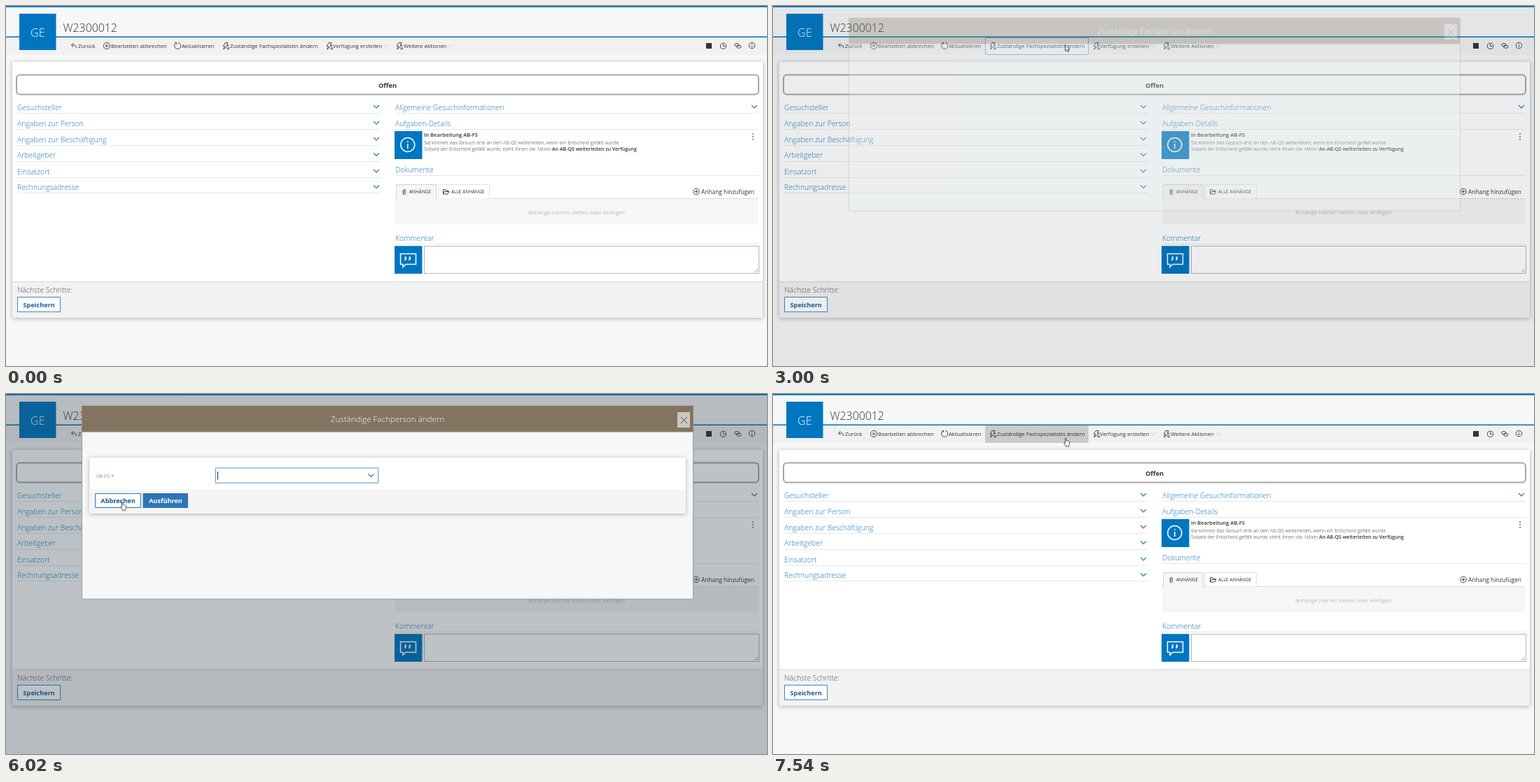
These frames come from a looping animation (1087x515 px, 8 s). An HTML page:

```html
<!DOCTYPE html>
<html lang="de">
<head>
<meta charset="utf-8">
<title>Zuständige Fachperson ändern</title>
<style>
html, body { margin: 0; width: 100%; height: 100%; overflow: hidden; background: #f7f7f7; }
svg { display: block; width: 1087px; height: 515px; }
text { font-family: "Open Sans", "Noto Sans", sans-serif; font-size: 7.7px; fill: #333; white-space: pre; }
.mid { text-anchor: middle; }
.head { font-size: 10.4px; font-weight: 300; fill: #1a78ba; }
.note { font-size: 7.03px; font-weight: 300; }
.strong { font-weight: 600; }
.btn { font-size: 9.15px; font-weight: 700; fill: #1b5c9c; }
.line { fill: none; stroke: #333; stroke-width: .9; }
.rule { stroke: #e6e6e6; }
.chev { fill: none; stroke: #1a78ba; stroke-width: 1.1; }
.white { fill: none; stroke: #fff; stroke-width: 1.5; }

.play, .play * { animation: 8s step-end infinite; }
#hover { animation-name: hover; }
#focus { animation-name: focus; }
#shade { animation-name: shade; }
#dialog { animation-name: dialog; }
#form { animation-name: form; }
#caret { animation-name: caret; }
#run { animation-name: run; }
#cancel { animation-name: cancel; }
#load { animation-name: load; }
#cursor { animation-name: move; }
#arrow { animation-name: arrow; }
#hand { animation-name: hand; }
#beam { animation-name: beam; }

@keyframes hover { 0%, 37.5% { opacity: 0 } 31.25%, 94.25%, 100% { opacity: 1 } }
@keyframes focus { 0%, 81.5%, 100% { opacity: 0 } 37.5% { opacity: 1 } }
@keyframes shade { 0%, 81.5%, 100% { opacity: 0 } 37.5% { opacity: .09 } 44% { opacity: .3 } }
@keyframes dialog { 0%, 81.5%, 100% { opacity: 0 } 37.5% { opacity: .28 } 44% { opacity: 1 } }
@keyframes form { 0%, 81.5%, 100% { opacity: 0 } 50.25% { opacity: 1 } }
@keyframes caret { 0%, 56.5%, 69%, 100% { opacity: 0 } 50.25%, 62.75%, 75.25% { opacity: 1 } }
@keyframes run { 0%, 69%, 100% { fill: #2e75b6 } 62.75% { fill: #1f5c98 } }
@keyframes cancel { 0%, 81.5%, 100% { fill: #2e75b6 } 69% { fill: #1b4f86 } }
@keyframes load { 0%, 88%, 100% { opacity: 0 } 81.5% { opacity: 1 } }
@keyframes arrow {
  0%, 31.25%, 50.25%, 62.75%, 94.25%, 100% { opacity: 0 }
  6.25%, 37.5%, 56.5%, 81.5% { opacity: 1 }
}
@keyframes hand { 0%, 37.5%, 81.5% { opacity: 0 } 31.25%, 62.75%, 94.25%, 100% { opacity: 1 } }
@keyframes beam { 0%, 56.5%, 100% { opacity: 0 } 50.25% { opacity: 1 } }
@keyframes move {
  0%, 6.25% { transform: translate(1010px, 493px) }
  12.5% { transform: translate(630px, 291px) }
  18.75% { transform: translate(482px, 182px) }
  25% { transform: translate(443px, 70px) }
  31.25% { transform: translate(416px, 56px) }
  37.5% { transform: translate(417px, 55px) }
  44% { transform: translate(418px, 54px) }
  50.25% { transform: translate(455px, 112px) }
  56.5% { transform: translate(486px, 138px) }
  62.75% { transform: translate(224px, 148px) }
  69% { transform: translate(162px, 153px) }
  75.25% { transform: translate(163px, 153.5px) }
  81.5% { transform: translate(165px, 153px) }
  88% { transform: translate(169px, 154px) }
  94.25%, 100% { transform: translate(415px, 62px) }
}
</style>
</head>
<body>
<svg viewBox="0 0 1087 515">
  <defs>
    <path id="chevron" d="M-4 -2L0 2L4 -2"/>
    <path id="bolt" d="M-1 -4.5H3L1 -1H4L-3.5 5L-1.2 .8H-3.8ZM1 4.5L4 1.5M2 4.8H4.3V2.5"/>
    <filter id="soft" x="-5%" y="-10%" width="110%" height="125%">
      <feDropShadow dx="0" dy="1" stdDeviation="3" flood-color="#000" flood-opacity=".3"/>
    </filter>
  </defs>

  <!-- header and toolbar -->
  <path fill="#f7f7f7" d="M0 0H1087V515H0z"/>
  <path fill="#f1f1f1" d="M0 45H1087V70H0z"/>
  <path fill="#0072b8" d="M0 0H1087V1.8H0zM0 43.6H1087V45.1H0z"/>
  <path fill="#0076c0" d="M19 11H71.5V63H19z"/>
  <text class="mid" x="45.3" y="43.5" style="font-size:16px;font-weight:300;fill:#fff">GE</text>
  <text x="81.5" y="36.5" style="font-size:15.8px;font-weight:300">W2300012</text>
  <g class="play">
    <path id="hover" fill="#cacaca" d="M303 45H450.5V70H303z"/>
    <path id="focus" fill="#f4f8fc" stroke="#7fb0e2" d="M303.5 45.5H450.5V69.5H303.5z"/>
  </g>
  <g class="line">
    <path d="M96.5 53L93.5 56L96.5 59M93.5 56H98.5Q101 56.5 100.5 60"/>
    <circle cx="144" cy="57" r="4.6"/>
    <path d="M142 55L146 59M146 55L142 59M242.2 53.3A4.6 4.6 0 1 0 246 52.3M241 52.5H243.5V55"/>
    <use href="#bolt" x="314" y="57"/>
    <use href="#bolt" x="462" y="57"/>
    <use href="#bolt" x="562" y="57"/>
    <circle cx="1024.5" cy="57.3" r="4.1"/>
    <path d="M1024.5 54.5V57.5H1027"/>
    <rect x="1040.8" y="53.6" width="6" height="4" rx="2"/>
    <rect x="1043.8" y="56.2" width="6" height="4" rx="2"/>
    <circle cx="1065.5" cy="56.5" r="4.2"/>
    <path d="M1065.5 56V59M1065.5 53.8V55"/>
    <g stroke="#c4c4c4" stroke-width=".8">
      <use href="#chevron" x="543.5" y="57"/>
      <use href="#chevron" x="636" y="57"/>
    </g>
  </g>
  <path fill="#333" d="M1000 53H1008V61H1000z"/>
  <text x="103" y="59.8">Zurück</text>
  <text x="150" y="59.8">Bearbeiten abbrechen</text>
  <text x="251" y="59.8">Aktualisieren</text>
  <text x="320" y="59.8">Zuständige Fachspezialistin ändern</text>
  <text x="467" y="59.8">Verfügung erstellen</text>
  <text x="568" y="59.8">Weitere Aktionen</text>

  <!-- main panel -->
  <path filter="url(#soft)" fill="#fff" d="M9 80H1081V446H9z"/>
  <path fill="#f2f2f2" d="M9 394H1081V446H9z"/>
  <path stroke="#dedede" stroke-width="1.5" d="M9 394.5H1081"/>
  <rect x="15" y="98.5" width="1060" height="28" rx="5" fill="#fff" stroke="#a6a6a6" stroke-width="2"/>
  <text class="mid" x="545" y="116.5" style="font-size:9.3px;font-weight:700">Offen</text>

  <path class="rule" d="M16 153.5H536M16 176.5H536M16 199.5H536M16 222.5H536M16 245.5H536M16 267.5H536M556 153.5H1075M556 176.5H1075M556 242.5H1075M556 340.5H1075"/>
  <g class="chev">
    <use href="#chevron" x="529" y="144"/>
    <use href="#chevron" x="529" y="167"/>
    <use href="#chevron" x="529" y="190"/>
    <use href="#chevron" x="529" y="212.5"/>
    <use href="#chevron" x="529" y="236"/>
    <use href="#chevron" x="529" y="258.5"/>
    <use href="#chevron" x="1069" y="144"/>
  </g>
  <text class="head" x="16" y="148.5">Gesuchsteller</text>
  <text class="head" x="16" y="171.7">Angaben zur Person</text>
  <text class="head" x="16" y="194.5">Angaben zur Beschäftigung</text>
  <text class="head" x="16" y="217.3">Arbeitgeber</text>
  <text class="head" x="16" y="240.7">Einsatzort</text>
  <text class="head" x="16" y="263.3">Rechnungsadresse</text>
  <text class="head" x="556" y="148.5">Allgemeine Gesuchinformationen</text>
  <text class="head" x="556" y="171.7">Aufgaben-Details</text>
  <text class="head" x="556" y="238.3">Dokumente</text>
  <text class="head" x="556" y="335.7">Kommentar</text>

  <!-- task details -->
  <path fill="#0076c0" d="M555 179H594.5V219H555zM555 343.3H594.5V383H555z"/>
  <g class="white">
    <circle cx="573.8" cy="198.5" r="10"/>
    <path d="M573.8 197V204M573.8 193V195"/>
    <path d="M563.5 354.5H585.5V369.5H571L567 373.5V369.5H563.5z"/>
    <path stroke-width="2.2" d="M570.8 358.5V361.5M570.8 361Q570.8 363 569.5 363.5M576.8 358.5V361.5M576.8 361Q576.8 363 575.5 363.5"/>
  </g>
  <text class="strong" x="597" y="187.3" style="font-size:7.6px">In Bearbeitung AB-FS</text>
  <text class="note" x="597" y="197.5">Sie können das Gesuch erst an den AB-QS weiterleiten, wenn ein Entscheid gefällt wurde.</text>
  <text class="note" x="597" y="207.3">Sobald der Entscheid gefällt wurde, steht Ihnen die Aktion</text>
  <text class="note strong" x="780" y="207.3">An AB-QS weiterleiten zu Verfügung</text>
  <path fill="#444" d="M1066.3 182.5h1.5v1.5h-1.5zM1066.3 186.2h1.5v1.5h-1.5zM1066.3 190h1.5v1.5h-1.5z"/>

  <!-- documents -->
  <path fill="#f6f6f6" d="M556 275.5H1074.5V312.5H556z"/>
  <path stroke="#dcdcdc" d="M556 275.5H1074.5"/>
  <path fill="#f6f6f6" stroke="#d2d2d2" d="M557.5 276V255.5H614.5V276"/>
  <path fill="#fff" stroke="#e2e2e2" d="M617.5 275.5V255.5H690.5V275.5"/>
  <g class="line" stroke-width=".8">
    <path stroke="#777" stroke-width="1.2" d="M567 263V268.5Q568.8 271 570.5 268.5V263.5Q569.2 261.2 568.5 263.5V268"/>
    <path d="M624.5 269V262.5H627.5L628.5 264H631.5V265.5M624.5 269L626.3 265.5H633L631 269z"/>
    <circle cx="986" cy="265.5" r="4.3"/>
    <path d="M983.5 265.5H988.5M986 263V268"/>
  </g>
  <text x="576" y="268" style="font-size:6.5px">ANHÄNGE</text>
  <text x="636" y="268" style="font-size:6.5px">ALLE ANHÄNGE</text>
  <text x="993" y="268.8" style="font-size:8.37px">Anhang hinzufügen</text>
  <text class="mid" x="815" y="297.5" style="fill:#b9b9b9">Anhänge hierher ziehen oder einfügen</text>

  <!-- comment and footer -->
  <path fill="#fff" stroke="#b4b4b4" d="M597.5 343.5H1075.5V382.5H597.5z"/>
  <path stroke="#888" stroke-width=".8" d="M1069 381L1074 376M1072 381L1074 379"/>
  <text class="head" x="16" y="410.3" style="fill:#555">Nächste Schritte:</text>
  <path fill="#fff" stroke="#3c86c4" d="M16.5 416.5H77.5V437.5H16.5z"/>
  <text class="btn mid" x="47.2" y="430.8">Speichern</text>

  <g class="play">
    <path id="shade" fill="#203440" d="M0 0H1087V515H0z"/>
    <g id="dialog">
      <path fill="#f1f2f2" stroke="#9a9a98" d="M108.5 17H981.5V293H108.5z"/>
      <path fill="#837361" d="M108.5 17H981.5V54H108.5z"/>
      <path stroke="#b5aca1" d="M109 54.3H981.5"/>
      <text class="mid" x="545" y="39.6" style="font-size:11.6px;font-weight:300;fill:#fff">Zuständige Fachperson ändern</text>
      <path fill="#cdc7c0" d="M959 26H977V48H959z"/>
      <path class="line" d="M964 33L973 42M973 33L964 42"/>
      <g id="form">
        <path fill="#f7f7f7" d="M109 55H981V292.5H109z"/>
        <path filter="url(#soft)" fill="#fff" d="M119.5 91H970.5V171H119.5z"/>
        <path fill="#f5f5f5" d="M119.5 136.5H970.5V171H119.5z"/>
        <text x="128.5" y="119.5" style="font-size:7.5px;font-weight:300;fill:#1b5c9c">AB-FS *</text>
        <path fill="none" stroke="#e4eef8" stroke-width="4" d="M299.5 106H531.5V127H299.5z"/>
        <path fill="#fff" stroke="#72a5d8" d="M299.5 106H531.5V127H299.5z"/>
        <use class="chev" href="#chevron" x="521.5" y="116.5"/>
        <path id="caret" fill="#222" d="M302 111H303V122.5H302z"/>
        <path fill="#fff" stroke="#2e75b6" d="M127.5 142.5H192.5V162.5H127.5z"/>
        <path id="run" fill="#2e75b6" d="M195.5 142H260V163H195.5z"/>
        <text id="cancel" class="btn mid" x="160" y="156">Abbrechen</text>
        <text class="btn mid" x="228" y="156" style="fill:#fff">Ausführen</text>
      </g>
    </g>
    <g id="load">
      <path fill="#f7f7f7" d="M0 1.8H1087V515H0z"/>
      <g fill="#0076c0">
        <circle cx="533.5" cy="263" r="5.5"/>
        <circle cx="545" cy="263" r="3.4"/>
        <circle cx="556.5" cy="263" r=".9"/>
      </g>
    </g>
    <g id="cursor" fill="#fff" stroke="#222" stroke-width=".8" stroke-linejoin="round">
      <path id="arrow" d="M.5 .5V9.5L2.6 7.5L4.1 10.6L5.5 10L4.1 7H7z"/>
      <path id="hand" d="M2.4 8V1.4Q3.2 0 4 1.4V5Q5 4.2 5.6 5.2Q6.6 4.7 7.1 5.7Q8.2 5.3 8.6 6.5V9.5L7.6 11.5V13H3.2V11.8L.6 8.4Q.6 6.8 2.4 8z"/>
      <path id="beam" fill="none" d="M0 0H1.5L2 .5L2.5 0H4M2 .5V10.5M0 11H1.5L2 10.5L2.5 11H4"/>
    </g>
  </g>
</svg>
</body>
</html>
```
